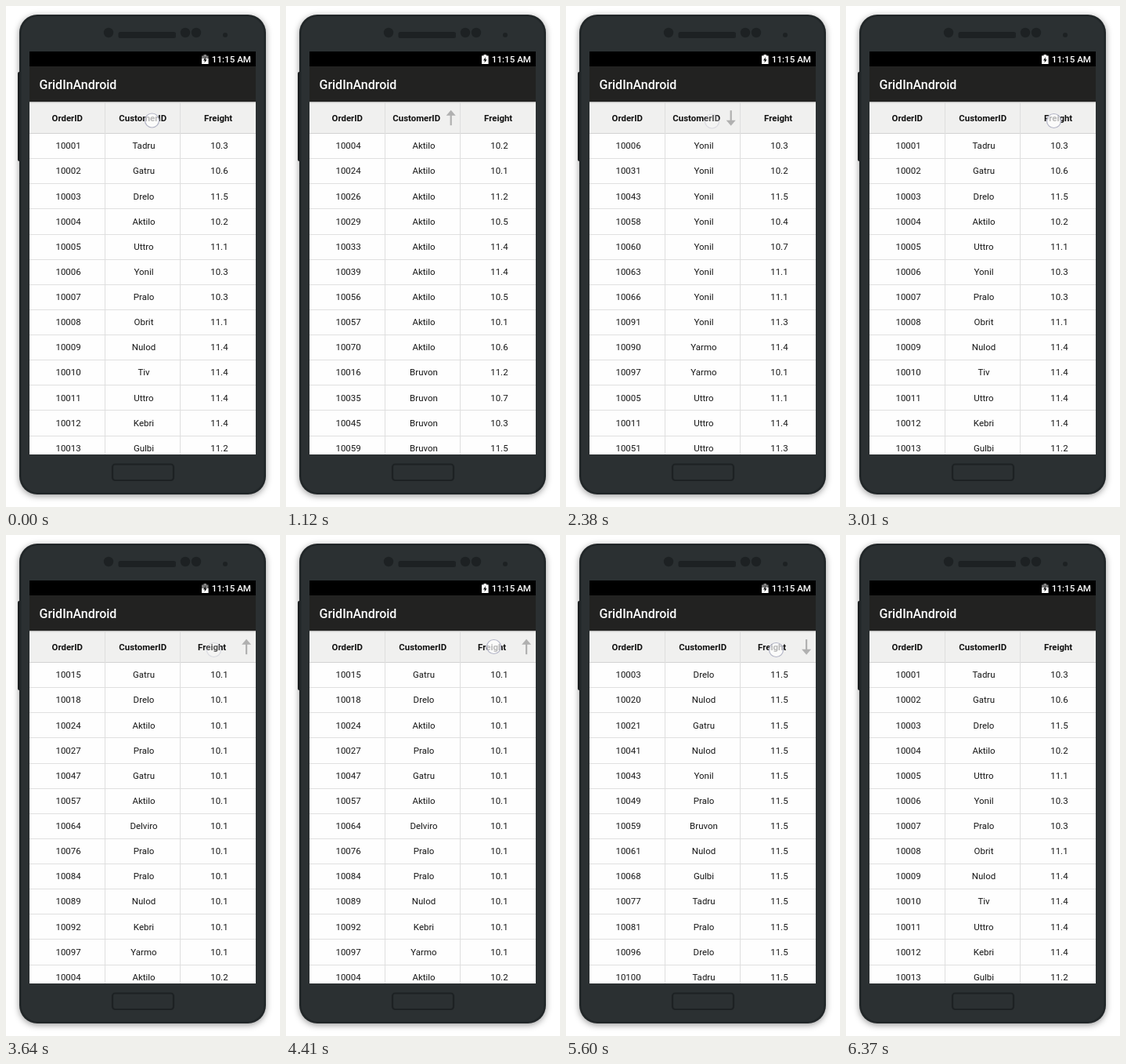
Recreate the animation shown at these times as an HTML page with a canvas. Size 350x639 px, loop 6.4 s.

```html
<!DOCTYPE html>
<html lang="en">
<head>
<meta charset="utf-8">
<title>Sortable grid</title>
<style>
  html, body { margin: 0; width: 100%; height: 100%; overflow: hidden; background: #fff; }
  canvas { display: block; width: 350px; height: 639px; }
</style>
</head>
<body>
<canvas id="stage"></canvas>
<script>
const W = 350, H = 639, LOOP = 6400, STEP = 70;
const FONT = 'Roboto, "Open Sans", sans-serif';
const canvas = document.getElementById('stage');
const ctx = canvas.getContext('2d');
const dpr = window.devicePixelRatio || 1;
canvas.width = W * dpr;
canvas.height = H * dpr;

// customer -> "order:freight in tenths"
const orders = {
  Aktilo: '4:102 24:101 26:112 29:105 33:114 39:114 56:105 57:101 70:106',
  Bruvon: '16:112 35:107 45:103 59:115',
  Delviro: '64:101',
  Drelo: '3:115 18:101 96:115',
  Gatru: '2:106 15:101 21:115 47:101',
  Gulbi: '13:112 68:115',
  Kebri: '12:114 92:101',
  Nulod: '9:114 20:115 41:115 61:115 89:101',
  Obrit: '8:111',
  Pralo: '7:103 27:101 49:115 76:101 81:115 84:101',
  Tadru: '1:103 77:115 100:115',
  Tiv: '10:114',
  Uttro: '5:111 11:114 51:113',
  Yarmo: '90:114 97:101',
  Yonil: '6:103 31:102 43:115 58:104 60:107 63:111 66:111 91:113'
};
const rows = Object.entries(orders).flatMap(([name, list]) =>
  list.split(' ').map(pair => {
    const [id, freight] = pair.split(':').map(Number);
    return [10000 + id, name, (freight / 10).toFixed(1)];
  })).sort((a, b) => a[0] - b[0]);

const sorted = (col, dir) => rows.slice()
  .sort((a, b) => dir * (a[col] < b[col] ? -1 : a[col] > b[col] ? 1 : 0))
  .slice(0, 13);

const view = (at, col, dir) => ({ at, col, dir, rows: sorted(col, dir) });
const views = [
  view(0, 0, 1), view(1120, 1, 1), view(1470, 1, -1), view(2450, 0, 1),
  view(3640, 2, 1), view(4970, 2, -1), view(6300, 0, 1)
];

const taps = [
  { on: 0, fade: 140, off: 1050, x: 186.5, y: 146 },
  { on: 1540, fade: 1750, off: 2730, x: 186.5, y: 147 },
  { on: 3010, fade: 3080, off: 3990, x: 265.5, y: 146.5 },
  { on: 4410, fade: 4410, off: 5250, x: 265.5, y: 142.5 },
  { on: 5600, fade: 5740, off: 6370, x: 268.5, y: 146.5 }
];

// [time, top edge of the bright part]
const charge = [[0, 67], [70, 62], [1540, 68], [1680, 65], [1820, 62],
  [3150, 68], [4130, 65], [4200, 62], [5600, 67]];

function rect(x, y, w, h, color) {
  ctx.fillStyle = color;
  ctx.fillRect(x, y, w, h);
}

function roundRect(x, y, w, h, r) {
  ctx.beginPath();
  ctx.roundRect(x, y, w, h, r);
}

function disc(x, y, r, color) {
  ctx.beginPath();
  ctx.arc(x, y, r, 0, Math.PI * 2);
  ctx.fillStyle = color;
  ctx.fill();
}

function text(str, x, y, size, weight, color, align = 'center') {
  ctx.font = `${weight} ${size}px ${FONT}`;
  ctx.textAlign = align;
  ctx.fillStyle = color;
  ctx.fillText(str, x, y);
}

function drawPhone() {
  const dark = '#1d2123';
  roundRect(15, 84, 6, 114, 2);
  ctx.fillStyle = '#202426';
  ctx.fill();

  ctx.save();
  ctx.shadowColor = 'rgba(0,0,0,0.4)';
  ctx.shadowBlur = 8 * dpr;
  ctx.shadowOffsetY = 2 * dpr;
  roundRect(17, 11, 315, 612, 23);
  ctx.fillStyle = '#212628';
  ctx.fill();
  ctx.restore();
  roundRect(19.5, 13.5, 310, 607, 21);
  ctx.fillStyle = '#2b3032';
  ctx.fill();

  for (const x of [131, 229, 243]) disc(x, 34, 6.2, dark);
  disc(280, 37, 3, dark);
  roundRect(143.5, 33, 73.5, 8, 2.5);
  ctx.fill();
  roundRect(136, 584.5, 78, 20.5, 3.5);
  ctx.strokeStyle = dark;
  ctx.lineWidth = 2.2;
  ctx.stroke();
}

function drawBattery(top) {
  rect(252.5, 62, 3.5, 2, top < 64 ? '#fff' : '#8a8a8a');
  rect(250, 63.5, 8.5, 10.5, '#777');
  const y = Math.max(top, 63.5);
  rect(250, y, 8.5, 74 - y, '#fff');
  ctx.beginPath();
  [[255, 65], [252, 69.4], [254, 69.4], [253.5, 72.6], [256.6, 68.2], [254.6, 68.2]]
    .forEach(([px, py]) => ctx.lineTo(px, py));
  ctx.closePath();
  ctx.fillStyle = '#000';
  ctx.fill();
}

function drawArrow(x, dir) {
  ctx.save();
  ctx.translate(x, 142.7);
  ctx.scale(1, dir);
  rect(-1.1, -6, 2.2, 15.5, '#b0b0b0');
  ctx.beginPath();
  ctx.moveTo(0, -10);
  ctx.lineTo(6, -3);
  ctx.lineTo(-6, -3);
  ctx.fill();
  ctx.restore();
}

function drawGrid(v) {
  const colW = 96.4, rowH = 32.13, top = 162;
  rect(30, 122, 289, 450, '#fefefe');
  rect(30, 122, 289, 40, '#f0f0ef');
  rect(30, 122, 289, 1, '#b9b9b8');
  rect(30, 123, 289, 1, '#e2e2e1');

  for (let i = 0; i < 13; i++)
    rect(30, Math.round(top + i * rowH), 289, 1, i ? '#e0e0e0' : '#d3d3d3');
  for (const x of [126, 222]) rect(x, 123, 1, 449, '#dedede');

  ['OrderID', 'CustomerID', 'Freight'].forEach((label, c) => {
    const mid = 78.3 + c * colW, active = c > 0 && c === v.col;
    text(label, mid - (active ? 8 : 0), 146.5, 11.4, 700, '#111');
    if (active) drawArrow(mid + 36, v.dir);
  });
  v.rows.forEach((row, r) => row.forEach((cell, c) =>
    text(cell, 79.6 + c * colW, Math.round(182.3 + r * rowH), 11.5, 400, '#161616')));
}

function drawTap(tap, t) {
  if (t < tap.on || t >= tap.off) return;
  const p = Math.max(0, (t - tap.fade) / (tap.off - tap.fade));
  ctx.save();
  ctx.globalAlpha = 1 - p;
  disc(tap.x, tap.y, 9, 'rgba(255,255,255,0.7)');
  ctx.strokeStyle = '#b2b4c6';
  ctx.lineWidth = 1.2;
  ctx.stroke();
  ctx.restore();
}

function draw(time) {
  const t = Math.floor((time % LOOP) / STEP) * STEP;
  ctx.setTransform(dpr, 0, 0, dpr, 0, 0);
  rect(0, 0, W, H, '#fff');
  drawPhone();

  ctx.save();
  ctx.beginPath();
  ctx.rect(30, 58, 289, 514);
  ctx.clip();
  rect(30, 58, 289, 19, '#000');
  rect(30, 77, 289, 45, '#222221');
  drawBattery(charge.filter(c => c[0] <= t).pop()[1]);
  text('11:15 AM', 313, 72.3, 11.6, 500, '#fff', 'right');
  text('GridInAndroid', 42.5, 106, 16, 500, '#fff', 'left');
  drawGrid(views.filter(v => v.at <= t).pop());
  taps.forEach(tap => drawTap(tap, t));
  ctx.restore();
}

const start = performance.now();
function tick() {
  draw(performance.now() - start);
  requestAnimationFrame(tick);
}
tick();
</script>
</body>
</html>
```
